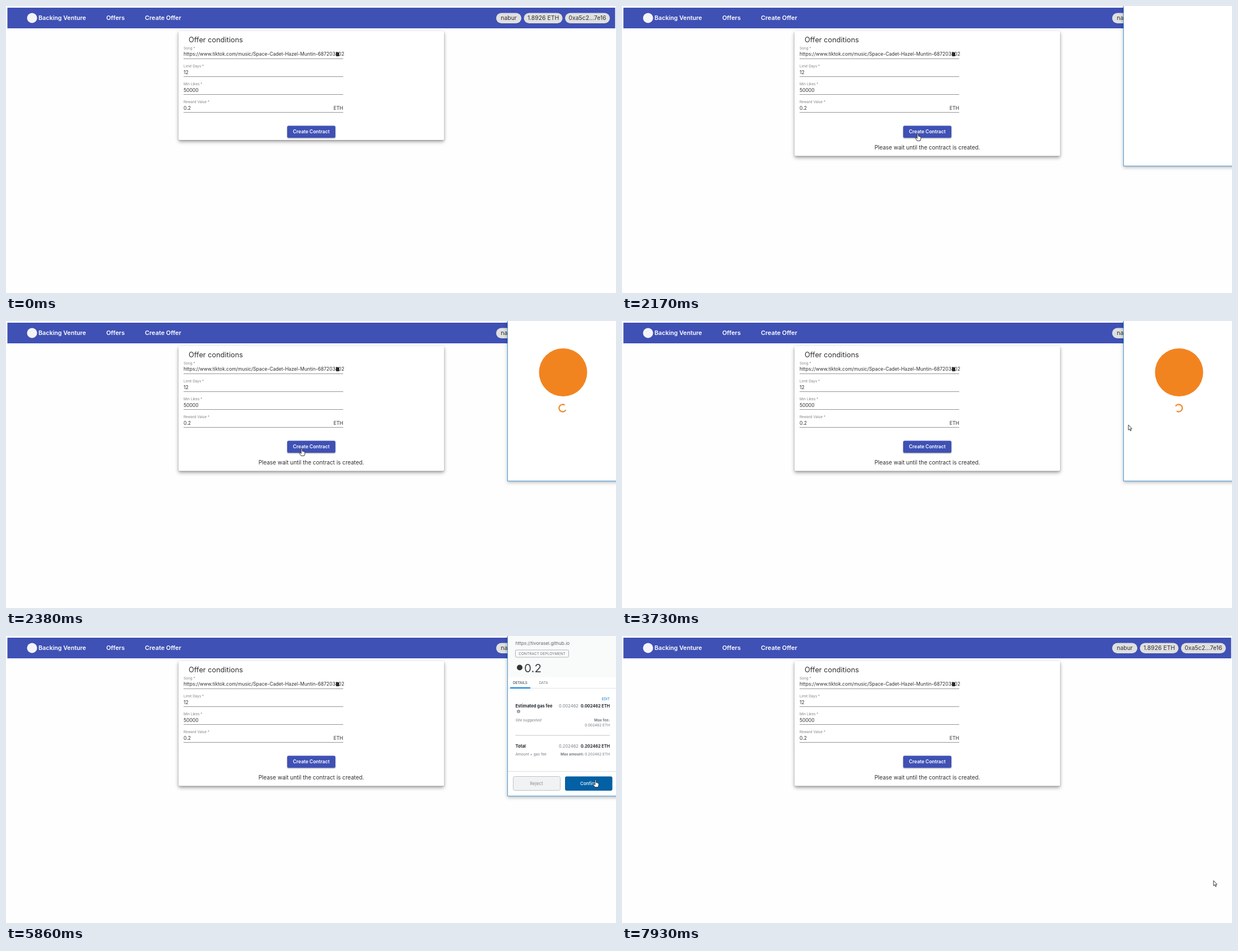
Write an HTML page that moves like this. It is 1089x514 px and loops after 7990 ms.

```html
<!DOCTYPE html>
<html lang="en">
<head>
<meta charset="utf-8">
<title>Create offer</title>
<style>
  html, body { margin: 0; width: 100%; height: 100%; overflow: hidden; background: #fefefe; }
  svg { display: block; width: 100vw; height: 100vh; font-family: Inter, "Open Sans", sans-serif; }
  #card { filter: drop-shadow(0 1px 1px rgba(0,0,0,.2)) drop-shadow(0 3px 3px rgba(0,0,0,.35)); }
  #button { filter: drop-shadow(0 1px 1px rgba(0,0,0,.4)); }
  #frame { filter: drop-shadow(0 2px 3px rgba(0,0,0,.3)); }
</style>
</head>
<body>
<svg id="stage" viewBox="0 0 1089 514"></svg>
<script>
const LOOP = 7990;
const BLUE = '#3f51b5', ACTION = '#037dd6', INK = '#303030', GREY = '#747a80';

const text = (x, y, size, str, fill = INK, extra = '') =>
  `<text x="${x}" y="${y}" font-size="${size}" fill="${fill}" ${extra}>${str}</text>`;
const rect = (x, y, w, h, fill, extra = '') =>
  `<rect x="${x}" y="${y}" width="${w}" height="${h}" fill="${fill}" ${extra}/>`;
const circle = (x, y, r, fill, extra = '') =>
  `<circle cx="${x}" cy="${y}" r="${r}" fill="${fill}" ${extra}/>`;
const MID = 'text-anchor="middle"', END = 'text-anchor="end"';
const SEMI = 'font-weight="600"', BOLD = 'font-weight="700"';

const chip = (x, w, str) =>
  rect(x, 12.5, w, 18.5, '#e0e0e0', 'rx="9.25"') + text(x + w / 2, 25.2, 10.4, str, INK, MID);

const field = (i, label, value) => {
  const y = 77.5 + i * 32.2;
  return text(317, y, 6.4, label, '#858585') +
    text(317, y + 11.8, 8.55, value) +
    rect(317, Math.round(y + 16.3), 285, 1, '#949494');
};

const header =
  rect(2.5, 3, 1085, 37, BLUE) + circle(46.5, 21.5, 9, '#f4f4f8') +
  text(58, 24.6, 10.7, 'Backing Venture', '#fff', SEMI) +
  text(179, 25, 10.9, 'Offers', '#fff', SEMI) +
  text(248, 25, 10.9, 'Create Offer', '#fff', SEMI) +
  chip(875, 45, 'nabur') + chip(924.5, 69, '1.8926 ETH') + chip(998, 80, '0xa5c2...7e16');

const form =
  rect(308, 45, 474, 195, '#fff', 'id="card" rx="2"') +
  text(326, 65, 12.8, 'Offer conditions') +
  field(0, 'Song *', 'https://www.tiktok.com/music/Space-Cadet-Hazel-Muntin-687203802') +
  field(1, 'Limit Days *', '12') +
  field(2, 'Min Likes *', '50000') +
  field(3, 'Reward Value *', '0.2') +
  rect(589, 83, 6, 7, '#2b2b2b', 'rx="1"') +
  text(602, 186, 8.7, 'ETH', INK, END) +
  rect(502, 214.5, 86, 21.5, BLUE, 'id="button" rx="2.5"') +
  '<clipPath id="buttonClip">' + rect(502, 214.5, 86, 21.5, '#000', 'rx="2.5"') + '</clipPath>' +
  '<g clip-path="url(#buttonClip)">' + circle(528, 229, 0, '#fff', 'id="ripple"') + '</g>' +
  text(545, 228, 8.5, 'Create Contract', '#fff', `${MID} ${SEMI}`) +
  text(545, 257.4, 10, 'Please wait until the contract is created.', INK, `id="notice" ${MID}`);

const loading =
  circle(994.5, 92, 43, '#f28420') +
  '<path id="spinner" d="M4.2 -5A6.5 6.5 0 1 0 5.3 3.8" fill="none" stroke="#ec8f35" stroke-width="2.3"/>';

const feeRow = (y, label, amount) =>
  text(909.5, y, 7.6, label, '#24292e', BOLD) +
  text(1022, y, 7.6, amount, GREY, END) +
  text(1078, y, 7.3, amount + ' ETH', '#24292e', `${END} ${BOLD}`);

const details =
  rect(896, 0, 193, 74, '#f9fafa') +
  rect(909.5, 25, 95, 13, 'none', 'rx="2" stroke="#aeb2b6"') +
  text(957, 34, 6.6, 'CONTRACT DEPLOYMENT', GREY, MID) +
  circle(917, 56.5, 5, '#343434') +
  text(925, 64.5, 20.6, '0.2', '#3a3f44') +
  rect(896, 93, 193, 1, '#dfe2e5') + rect(900, 92, 36, 2, ACTION) +
  text(918, 86, 6.4, 'DETAILS', '#24292e', MID) +
  text(959.5, 86, 6.4, 'DATA', GREY, MID) +
  rect(909, 177.5, 169, 1, '#bfc3c7') + rect(896, 242, 193, 1, '#dcdfe2') +
  rect(905.5, 251.5, 84, 25, '#f1f2f3', 'rx="3" stroke="#bec2c6"') +
  text(947, 267, 8, 'Reject', '#898d91', MID) +
  rect(998, 251.5, 84.5, 25.5, ACTION, 'id="confirm" rx="3"') +
  text(1040.5, 267, 8, 'Confirm', '#fff', `${MID} font-weight="500"`);

const fees =
  text(909.5, 16.4, 8.2, 'https://tivorasel.github.io', '#5f656b') +
  text(1078, 114.5, 6.5, 'EDIT', ACTION, END) +
  feeRow(127.8, 'Estimated gas fee', '0.002462') +
  circle(915, 135, 3.1, '#989da2') + text(915, 137, 5, 'i', '#fff', `${MID} ${BOLD}`) +
  text(909.5, 153, 6.6, 'Site suggested', GREY, 'font-style="italic"') +
  text(1078, 152.8, 6.6, 'Max fee:', GREY, `${END} ${BOLD}`) +
  text(1078, 162, 6.5, '0.002462 ETH', GREY, END) +
  feeRow(200, 'Total', '0.202462') +
  text(909.5, 214, 6.6, 'Amount + gas fee', GREY) +
  text(1078, 214, 6.5, `<tspan ${BOLD}>Max amount:</tspan> 0.202462 ETH`, GREY, END);

const popup = '<g id="popup">' +
  rect(895.5, -5, 204, 291.5, '#fff', 'id="frame" stroke="#4a9fdc"') +
  `<g id="loading">${loading}</g><g id="details">${details}</g><g id="fees">${fees}</g></g>`;

const ink = 'fill="#fff" stroke="#222" stroke-width=".9" stroke-linejoin="round"';
const pointers =
  `<path id="arrow" ${ink} d="M0 0V9.4L2.2 7.4L3.7 10.8L5.1 10.2L3.7 6.9H6.4Z"/>` +
  `<path id="hand" ${ink} d="M-1 .8Q0 -.8 1 .8V5Q2 4 2.6 5.3Q3.7 4.6 4.2 5.9Q5.4 5.4 5.5 7V9.4L4.4 13H-1.2L-4.3 8.6Q-4.3 6.8 -2.7 7.6L-1 9Z"/>`;

document.getElementById('stage').innerHTML = header + form + popup + pointers;
const el = Object.fromEntries([...document.querySelectorAll('[id]')].map(n => [n.id, n]));

// [time, x, y] of the pointer tip
const PATH = [
  [340, 913, 475], [600, 720, 330], [820, 580, 252], [1020, 528, 228.4],
  [3120, 528, 228.4], [3718, 904, 186], [3930, 1008, 166], [4200, 1008, 166],
  [4800, 1020, 181.5], [5060, 1030, 189], [5860, 1054, 262],
  [7600, 1054, 262], [7930, 1056, 438]
];

function pointerAt(t) {
  const i = PATH.findIndex(p => p[0] > t);
  if (i < 0) return PATH[PATH.length - 1].slice(1);
  if (i === 0) return PATH[0].slice(1);
  const [t0, x0, y0] = PATH[i - 1], [t1, x1, y1] = PATH[i];
  const k = (t - t0) / (t1 - t0);
  return [x0 + (x1 - x0) * k, y0 + (y1 - y0) * k];
}

const show = (node, on) => node.setAttribute('visibility', on ? 'visible' : 'hidden');
const within = (t, a, b) => t >= a && t < b;
const clamp = v => Math.max(0, Math.min(1, v));
const inside = (x, y, l, top, r, b) => x > l && x < r && y > top && y < b;

function render(t) {
  const tick = t >= 7930 ? 7930 : Math.floor((t + 8) / 67.6) * 67.6;

  const expanded = t >= 1430;
  el.card.setAttribute('height', expanded ? 223.5 : 195);
  show(el.notice, expanded);

  el.ripple.setAttribute('r', 65 * clamp((tick - 1300) / 400));
  el.ripple.setAttribute('opacity', within(t, 1360, 1960) ? (t < 1900 ? .22 : .1) : 0);

  const open = within(t, 2100, 6330);
  const fading = t < 2170 || t >= 6260;
  el.popup.setAttribute('display', open ? 'inline' : 'none');
  el.popup.setAttribute('opacity', fading ? .5 : 1);
  el.loading.setAttribute('display', within(t, 2380, 3930) ? 'inline' : 'none');
  const spin = (tick - 2380) / 900 * 360;
  el.spinner.setAttribute('transform', `translate(993.8 156) rotate(${spin})`);

  const loaded = within(t, 3930, 6100);
  const dim = t >= 5930 ? .5 : 1;
  el.details.setAttribute('display', loaded ? 'inline' : 'none');
  el.fees.setAttribute('display', loaded && t >= 4000 ? 'inline' : 'none');
  el.details.setAttribute('opacity', dim);
  el.fees.setAttribute('opacity', dim);

  const [x, y] = pointerAt(tick);
  const onConfirm = loaded && inside(x, y, 998, 251, 1083, 277);
  const onButton = inside(x, y, 502, 214, 588, 236);
  el.confirm.setAttribute('fill', onConfirm ? '#0260a4' : ACTION);
  for (const node of [el.arrow, el.hand]) node.setAttribute('transform', `translate(${x} ${y})`);
  show(el.hand, t >= 340 && (onButton || onConfirm));
  show(el.arrow, t >= 340 && !onButton && !onConfirm);
}

const start = performance.now();
(function frame() {
  render((performance.now() - start) % LOOP);
  requestAnimationFrame(frame);
})();
</script>
</body>
</html>
```
